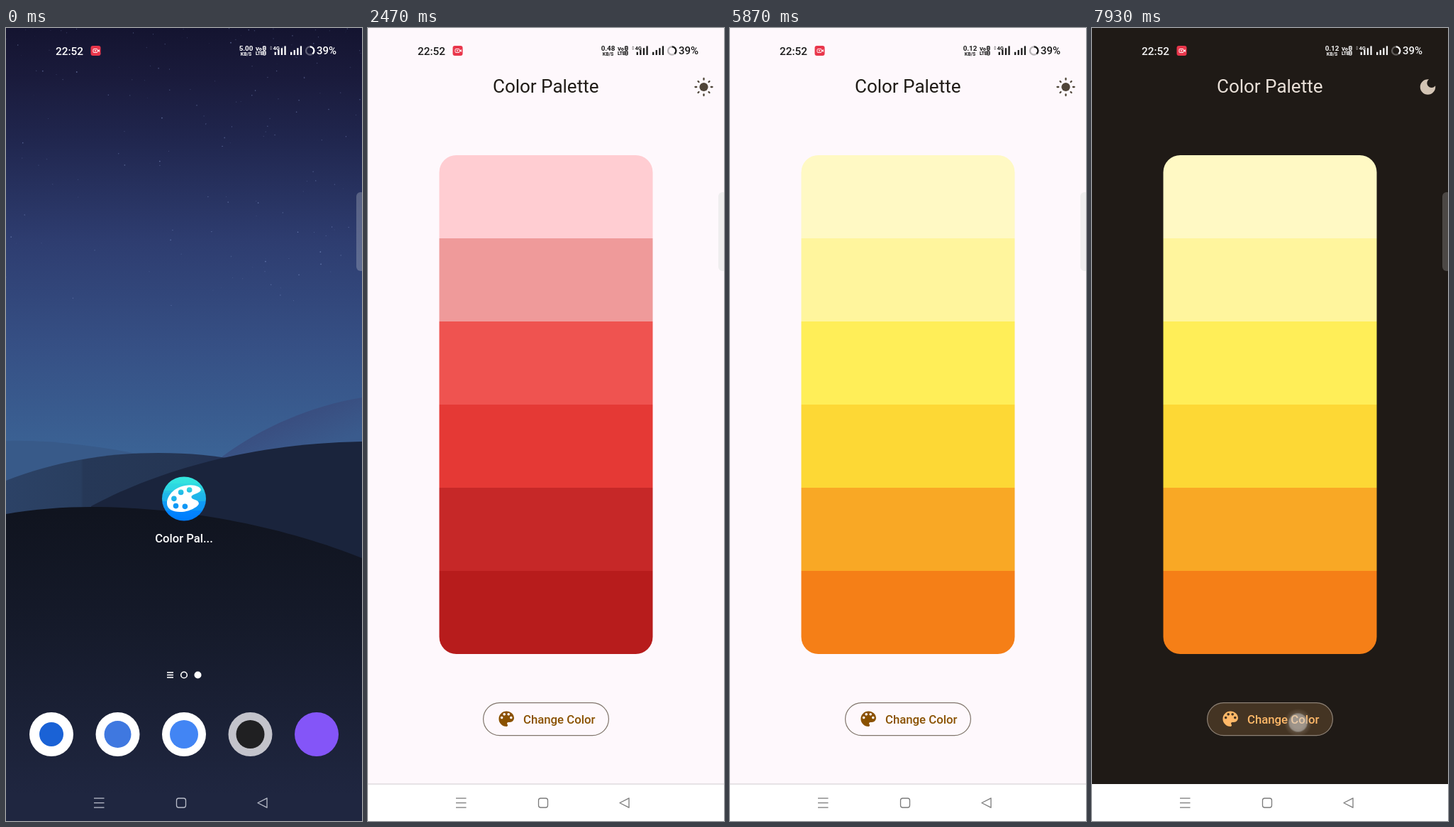
An HTML page with a canvas for the animation above (8000 ms loop, 502x1116 px).

```html
<!DOCTYPE html>
<html lang="en">
<head>
<meta charset="utf-8">
<title>Color Palette</title>
<style>
html, body { margin: 0; width: 100%; height: 100%; overflow: hidden; background: #000; }
canvas { display: block; width: 502px; height: 1116px; }
</style>
</head>
<body>
<canvas id="stage" width="502" height="1116"></canvas>
<script>
const W = 502, H = 1116, LOOP = 8000;
const ctx = document.getElementById('stage').getContext('2d');

const PALETTES = {
  red: ['#ffcdd2', '#ef9a9a', '#ef5350', '#e53935', '#c62828', '#b71c1c'],
  green: ['#dcedc8', '#c5e1a5', '#9ccc65', '#7cb342', '#558b2f', '#33691e'],
  yellow: ['#fff9c4', '#fff59d', '#ffee58', '#fdd835', '#f9a825', '#f57f17']
};
// Button presses: start, end of touch, position
const PRESSES = [
  [3200, 3330, 263, 968], [3840, 4000, 263, 968],
  [4670, 4800, 263, 970], [5250, 5390, 270, 972], [7600, 8100, 290.5, 977.5]
];
const TAPS = [[1470, 1600, 251, 662], [6530, 6640, 473.5, 83], ...PRESSES];

const PAINT = new Path2D('M182 576C182 545 215 503 278 503C300 503 319 512 319 522C319 536 281 538 281 551C281 564 311 560 311 577C311 590 280 603 270 606C258 610 245 611 235 611C205 611 182 600 182 576Z');
for (const [x, y] of [[273, 522], [238.5, 532], [210.5, 557.5], [218, 587], [255, 589]]) {
  PAINT.moveTo(x + 11, y);
  PAINT.arc(x, y, 11, 0, 7);
}
const PALETTE_ICON = new Path2D('M12 3c-4.97 0-9 4.03-9 9s4.03 9 9 9c.83 0 1.5-.67 1.5-1.5 0-.39-.15-.74-.39-1.01-.23-.26-.38-.61-.38-.99 0-.83.67-1.5 1.5-1.5H16c2.76 0 5-2.24 5-5 0-4.42-4.03-8-9-8zm-5.5 9c-.83 0-1.5-.67-1.5-1.5S5.67 9 6.5 9 8 9.67 8 10.5 7.33 12 6.5 12zm3-4C8.67 8 8 7.33 8 6.5S8.67 5 9.5 5s1.5.67 1.5 1.5S10.33 8 9.5 8zm5 0c-.83 0-1.5-.67-1.5-1.5S13.67 5 14.5 5s1.5.67 1.5 1.5S15.33 8 14.5 8zm3 4c-.83 0-1.5-.67-1.5-1.5S16.67 9 17.5 9s1.5.67 1.5 1.5-.67 1.5-1.5 1.5z');
const MOON_ICON = new Path2D('M12 3c-4.97 0-9 4.03-9 9s4.03 9 9 9s9-4.03 9-9c0-.46-.04-.92-.1-1.36c-.98 1.37-2.58 2.26-4.4 2.26c-2.98 0-5.4-2.42-5.4-5.4c0-1.81.89-3.42 2.26-4.4C12.92 3.04 12.46 3 12 3z');

const clamp = v => Math.max(0, Math.min(1, v));
const lerp = (a, b, p) => a + (b - a) * p;
const easeOut = p => 1 - (1 - p) ** 3;

function mix(a, b, p) {
  const part = (c, i) => parseInt(c.slice(i, i + 2), 16);
  return `rgb(${[1, 3, 5].map(i => Math.round(lerp(part(a, i), part(b, i), p)))})`;
}

function gradient(x0, y0, x1, y1, ...stops) {
  const g = ctx.createLinearGradient(x0, y0, x1, y1);
  stops.forEach(([at, color]) => g.addColorStop(at, color));
  return g;
}

function rect(x, y, w, h, color) {
  ctx.fillStyle = color;
  ctx.fillRect(x, y, w, h);
}

function roundPath(x, y, w, h, r) {
  ctx.beginPath();
  ctx.roundRect(x, y, w, h, r);
}

function roundFill(x, y, w, h, r, color) {
  roundPath(x, y, w, h, r);
  ctx.fillStyle = color;
  ctx.fill();
}

function disc(x, y, r, color) {
  ctx.beginPath();
  ctx.arc(x, y, r, 0, 7);
  ctx.fillStyle = color;
  ctx.fill();
}

function arc(x, y, r, from, to, color, width) {
  ctx.beginPath();
  ctx.arc(x, y, r, from, to);
  stroke(color, width);
}

function stroke(color, width) {
  ctx.strokeStyle = color;
  ctx.lineWidth = width;
  ctx.stroke();
}

function line(x0, y0, x1, y1, color, width) {
  ctx.beginPath();
  ctx.moveTo(x0, y0);
  ctx.lineTo(x1, y1);
  stroke(color, width);
}

function shape(path, color) {
  ctx.fillStyle = color;
  ctx.fill(new Path2D(path));
}

function text(str, x, y, font, color, align = 'left') {
  ctx.font = font + ' Roboto, sans-serif';
  ctx.textAlign = align;
  ctx.fillStyle = color;
  ctx.fillText(str, x, y);
}

function glyph(path, cx, cy, color) {
  ctx.save();
  ctx.translate(cx, cy);
  ctx.scale(1.195, 1.195);
  ctx.translate(-12, -12);
  ctx.fillStyle = color;
  ctx.fill(path);
  ctx.restore();
}

function statusBar(t, color) {
  text('22:52', 70, 37.5, '500 15.3px', color);
  roundFill(119.5, 25, 14, 14, 3, '#e9364b');
  roundPath(123, 29.5, 6, 5, 1);
  stroke('#fff', 1);
  shape('M129 32l2.8-2v4z', '#fff');
  disc(126, 32, 1, '#fff');

  const speed = t < 330 ? '5.00' : t < 4330 ? '0.48' : '0.12';
  text(speed, 338.5, 31.8, '700 9.8px', color, 'center');
  text('KB/S', 338.5, 38.8, '700 6.8px', color, 'center');
  text('Vo', 352, 31.5, '900 7.4px', color);
  text('LTE', 352, 38.3, '900 6.4px', color);
  for (const y of [26, 32.8]) {
    roundPath(362.6, y, 3.4, 5, 0.8);
    stroke(color, 1.3);
    rect(363, y + 2, 3, 1, color);
  }
  text('4G', 376.5, 30.6, '700 7.6px', color);
  ctx.globalAlpha *= 0.5;
  shape('M372 27.5l1.7-2.2 1.7 2.2zM372 28.8l1.7 2.2 1.7-2.2z', color);
  ctx.globalAlpha *= 2;
  for (const x of [378.6, 401])
    for (let i = 0; i < 4; i++) rect(x + i * 4.6, 33.8 - i * 2.8, 2.3, 4.2 + i * 2.8, color);
  ctx.globalAlpha *= 0.3;
  arc(428.7, 32, 5.7, 0, 7, color, 2.3);
  ctx.globalAlpha /= 0.3;
  arc(428.7, 32, 5.7, -Math.PI / 2, Math.PI * 0.28, color, 2.3);
  text('39%', 438, 37.3, '500 15px', color);
}

function navIcons(color) {
  for (const y of [1084, 1090.5, 1097]) line(124, y, 138.5, y, color, 1.3);
  roundPath(240.5, 1084, 13, 13, 3);
  stroke(color, 1.3);
  ctx.lineJoin = 'round';
  ctx.beginPath();
  ctx.moveTo(355, 1090.5);
  ctx.lineTo(368, 1083.8);
  ctx.lineTo(368, 1097.2);
  ctx.closePath();
  stroke(color, 1.3);
}

const edgeHandle = color => roundFill(494, 231, 12, 111, 7, color);

// App icon centred on (x, y); r is the corner radius at full size
function appIcon(x, y, scale, r) {
  ctx.save();
  ctx.translate(x, y);
  ctx.scale(scale, scale);
  ctx.translate(-251, -558);
  roundPath(162, 469, 178, 178, r);
  ctx.fillStyle = gradient(0, 469, 0, 647,
    [0, '#35e6df'], [0.15, '#32e1df'], [0.15, '#2edae0'], [0.31, '#2bd2e3'],
    [0.31, '#25c1e5'], [0.37, '#25c1e5'], [0.37, '#20b8e9'], [0.56, '#1cb1ec'],
    [0.56, '#109bf5'], [0.76, '#0d95f6'], [0.76, '#0385fd'], [1, '#007cff']);
  ctx.fill();
  ctx.fillStyle = '#fff';
  ctx.fill(PAINT, 'evenodd');
  ctx.restore();
}

function stars() {
  let seed = 7;
  const rnd = () => (seed = seed * 16807 % 2147483647) / 2147483647;
  for (let i = 0; i < 170; i++) {
    const x = rnd() * W, y = rnd() ** 1.6 * 400;
    disc(x, y, 0.4 + rnd() * 0.5, `rgba(150,170,225,${0.12 + rnd() * 0.4})`);
  }
}

function home(t) {
  rect(0, 0, W, H, gradient(0, 0, 0, 600, [0, '#141430'], [0.12, '#1a1b3c'],
    [0.26, '#20264e'], [0.5, '#2e3d70'], [0.75, '#365085'], [1, '#3b6395']));
  stars();
  shape('M0 581C60 579 130 588 200 602V700H0Z', '#385a89');
  shape('M305 603C360 562 430 532 502 520V620H305Z',
    gradient(400, 535, 425, 600, [0, '#394b7d'], [1, '#3a5b8d']));
  shape('M0 637C70 610 140 598 215 598C260 598 295 602 330 608V700H0Z',
    gradient(0, 0, 330, 0, [0, '#2c4266'], [0.32, '#293e5f'], [0.33, '#263857'], [0.75, '#253654'], [1, '#222f52']));
  shape('M120 673C200 630 330 585 502 582V760H120Z', '#1a243c');
  shape('M0 684C40 677 80 674 120 674C260 674 400 705 502 746V1116H0Z',
    gradient(0, 680, 0, 1080, [0, '#10141f'], [0.4, '#151a2a'], [1, '#1f2640']));

  if (t < 1600) appIcon(251, 662.5, 62 / 178, 89);
  text('Color Pal...', 251, 724, '500 16.6px', '#fff', 'center');

  for (const y of [907, 910.5, 914]) line(227, y, 236, y, '#fff', 1.6);
  arc(251, 910.5, 4.3, 0, 7, '#fff', 1.6);
  disc(270.5, 910.5, 5, '#fff');

  [['#fff', '#1a62d6', 17], ['#fff', '#3f78e0', 19], ['#fff', '#4285f4', 20],
   ['#c3c3cb', '#202022', 20], ['#8455f8', '#8455f8', 1]].forEach(([tile, mark, r], i) => {
    const x = 64 + i * 93.5;
    disc(x, 994, 31, tile);
    disc(x, 994, r, mark);
  });
  navIcons('#b9bdc9');
  edgeHandle('rgba(190,195,205,.32)');
  statusBar(t, '#fff');
}

function splash(t) {
  const p = easeOut(clamp((t - 1600) / 350));
  const x = lerp(220, 0, p), y = lerp(631.5, 0, p);
  const w = lerp(62, W, p), h = lerp(62, H, p);
  ctx.save();
  roundPath(x, y, w, h, 31 * (1 - p));
  ctx.clip();
  rect(x, y, w, h, '#fff');
  rect(x, y, w, 50 * p, '#000');
  appIcon(251, y + h / 2, lerp(62 / 178, 1, p), lerp(89, 42, p));
  ctx.restore();
  if (p === 1) {
    navIcons('#7b7b7b');
    edgeHandle('#f8eff2');
  }
  statusBar(t, '#ececec');
}

function sun(x, y, color) {
  disc(x, y, 6.1, color);
  ctx.lineCap = 'round';
  for (let i = 0; i < 8; i++) {
    const a = i * Math.PI / 4, c = Math.cos(a), s = Math.sin(a);
    const from = i % 2 ? 9.9 : 10.3, to = i % 2 ? 11.3 : 12;
    line(x + c * from, y + s * from, x + c * to, y + s * to, color, 2.3);
  }
  ctx.lineCap = 'butt';
}

function ripples(t, dark) {
  const tint = dark ? '255,184,104' : '138,81,0';
  const peak = dark ? 0.165 : 0.1;
  ctx.save();
  roundPath(162.5, 949.5, 177, 46, 23);
  ctx.clip();
  for (const [start, end, x, y] of PRESSES) {
    const age = t - start;
    if (age < 0 || (age > 617 && t > end)) continue;
    const fade = end > LOOP ? 1 : 1 - clamp((age - 300) / 317);
    const grow = clamp(age / 320);
    rect(162, 949, 178, 47, `rgba(${tint},${peak * fade * Math.max(0.3, grow)})`);
    if (grow === 1) continue;
    const r = 20 + 180 * grow ** 1.4;
    const g = ctx.createRadialGradient(x, y, r * 0.5, x, y, r);
    g.addColorStop(0, `rgba(${tint},${peak * 1.1 * (1 - grow)})`);
    g.addColorStop(1, `rgba(${tint},0)`);
    rect(162, 949, 178, 47, g);
  }
  ctx.restore();
}

function app(t) {
  const p = clamp((t - 6600) / 190), dark = t >= 6600;
  const late = clamp((t - 6710) / 220);
  rect(0, 0, W, H, mix('#fef8fc', '#1f1a16', p));
  rect(0, 1064, W, 52, '#fff');
  if (p < 1) rect(0, 1063.5, W, 1, mix('#cfcbcf', '#1f1a16', p));
  navIcons('#7b7b7b');
  text('Color Palette', 250.7, 91, '400 26px', mix('#1f1b16', '#eae1d9', p), 'center');

  if (dark) {
    disc(473.5, 83, 24, `rgba(60,50,20,${0.15 * (1 - clamp((t - 6800) / 270))})`);
    glyph(MOON_ICON, 473.5, 83, mix('#ffffff', '#d3c4b4', clamp((t - 6850) / 220)));
  } else {
    sun(473.5, 83, '#4f4539');
  }

  const colors = PALETTES[t < 3330 ? 'red' : t < 4800 ? 'green' : 'yellow'];
  ctx.save();
  roundPath(100.5, 179, 301, 702, 24);
  ctx.clip();
  colors.forEach((c, i) => rect(100, 179 + i * 117, 302, 117, c));
  ctx.restore();

  ripples(t, dark);
  roundPath(162.6, 949.6, 176.8, 46, 23);
  stroke(mix('#80756b', '#8d8175', p), 1.2);
  glyph(PALETTE_ICON, 195.2, 972.3, mix('#8a5100', '#ffb868', p));
  text('Change Color', 219, 978.5, '500 16.75px', mix('#8a5100', '#ffb868', late));

  edgeHandle(dark ? 'rgba(255,255,255,.2)' : '#efeeef');
  statusBar(t, mix('#1a1a1a', '#f4f4f4', p));
}

function touches(t) {
  for (const [start, end, x, y] of TAPS) {
    if (t < start || t >= end) continue;
    const dark = t > 6600;
    if (dark) {
      const g = ctx.createRadialGradient(x, y, 8, x, y, 20);
      g.addColorStop(0, 'rgba(230,215,200,.3)');
      g.addColorStop(1, 'rgba(230,215,200,0)');
      disc(x, y, 20, g);
    }
    disc(x, y, 12.5, dark ? 'rgba(210,208,206,.45)' : 'rgba(255,255,255,.5)');
    arc(x, y, 12.8, 0, 7, dark ? 'rgba(150,145,140,.5)' : 'rgba(165,165,200,.55)', 1.6);
  }
}

function draw(now) {
  const t = now % LOOP;
  ctx.globalAlpha = 1;
  if (t < 1950) home(t);
  if (t >= 1600 && t < 2470) splash(t);
  if (t >= 2180) {
    ctx.globalAlpha = clamp((t - 2180) / 280);
    app(t);
    ctx.globalAlpha = 1;
  }
  touches(t);
  requestAnimationFrame(() => draw(performance.now() - begin));
}

const begin = performance.now();
draw(0);
</script>
</body>
</html>
```
